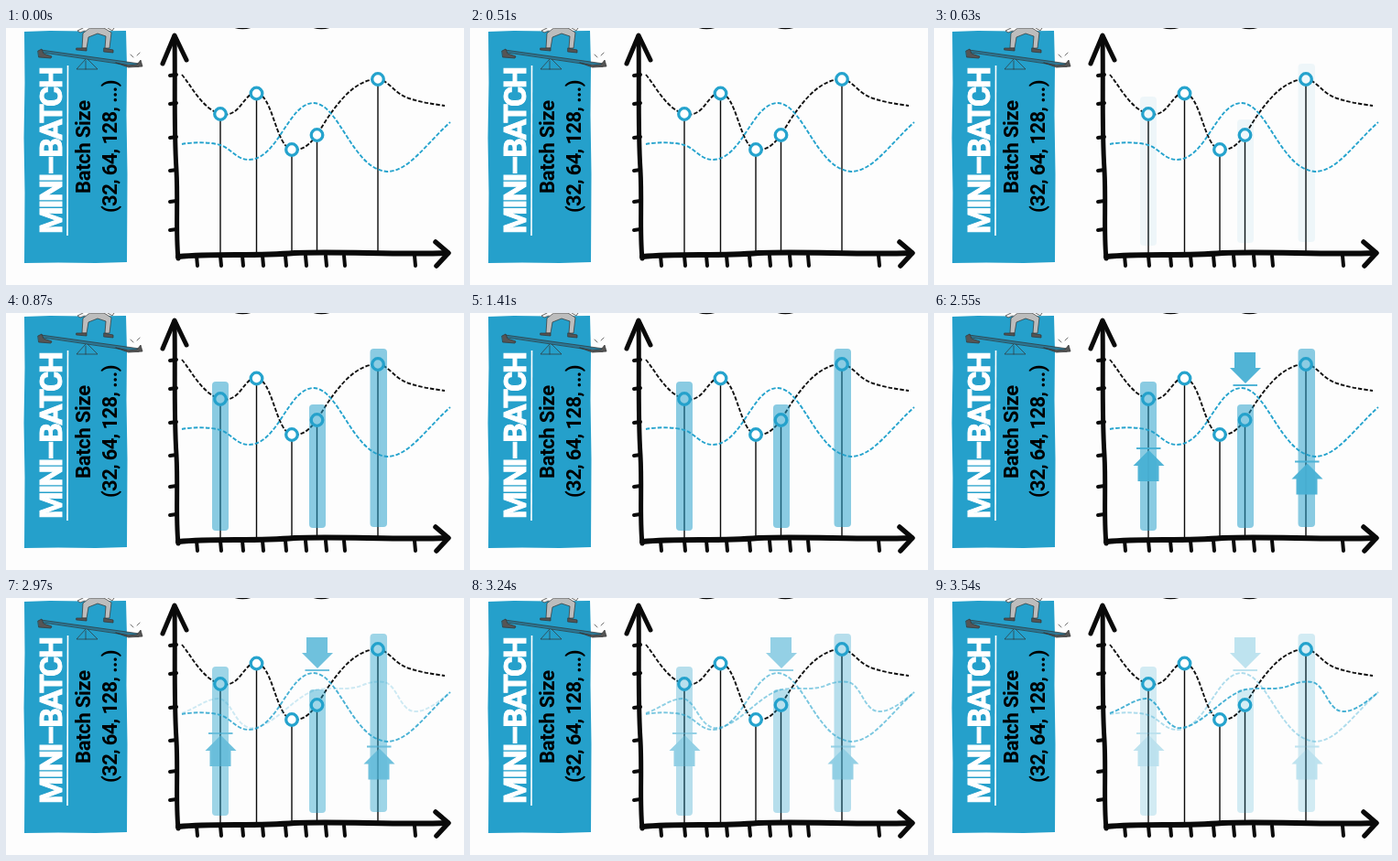
Recreate the animation shown at these times as an HTML page. Size 500 by 281 pixels, loop 3570 ms.

```html
<!DOCTYPE html>
<html lang="en">
<head>
<meta charset="utf-8">
<title>Mini-batch chart</title>
<style>
  html, body { margin: 0; width: 100%; height: 100%; overflow: hidden; background: #fdfdfd; }
  svg { display: block; width: 100vw; height: 100vh; }
  text { font-family: Roboto, sans-serif; font-weight: 700; }
  .ink { fill: none; stroke: #0a0a0a; stroke-linecap: round; stroke-linejoin: round; }
  .dash { fill: none; stroke-width: 1.9; stroke-dasharray: 4.5 2; }
  .blue { stroke: #25a3cd; }
</style>
</head>
<body>
<svg viewBox="0 0 500 281" preserveAspectRatio="none">
  <rect width="500" height="281" fill="#fdfdfd"/>

  <path fill="#25a0cb" d="M20 4L48 3L86 3.5L131 3L132 42L131.500 95L132.500 160L132 256L98 257L57 256.500L20 257L20.500 180L19.500 120L20.500 60Z"/>
  <g transform="rotate(-90)">
    <text x="-225" y="61" font-size="34" letter-spacing="-2.4" fill="#fff" stroke="#fff" stroke-width="1">MINI–BATCH</text>
    <text x="-181" y="91.500" font-size="22" letter-spacing="-.3">Batch Size</text>
    <text x="-202" y="121" font-size="22" letter-spacing="-.6">(32, 64, 128, ...)</text>
  </g>
  <path d="M67.500 41L67 227" stroke="#fff" stroke-width="1.600"/>

  <!-- figure on a seesaw -->
  <g stroke="#333" stroke-width=".7" stroke-linejoin="round" stroke-linecap="round">
    <path fill="none" d="M87 34L77 45H100L89 34M87 36V45M136 29L139 32M143 30L146 27"/>
    <path fill="#2b7795" d="M37 26L38 24L146 39L145 42Z"/>
    <path fill="#555" d="M35 25L39 23L41 28L50 31L49 33L36 32ZM120 38L133 41L143 40L147 35L149 42L134 43Z"/>
    <path fill="#bdbdbd" d="M92 0H107L115 5L113 22H108L109 9L100 6L90 10L88 22H83L84 6Z"/>
    <path fill="#eee" d="M84 0L78 3L81 5L86 3M111 0L116 3L118 0"/>
    <path fill="#555" d="M77 22H88V25L77 24ZM107 22L117 24V27L107 26Z"/>
  </g>

  <g class="ink">
    <path stroke-width="2.500" d="M249 -1.500Q258 1.500 268 -1.500M335 -1.500Q344 1.500 354 -1.500"/>
    <path stroke-width="5" d="M184 9C185 60 183 108 186 155C188 190 185 222 188 252"/>
    <path stroke-width="5" d="M171 39L184 8L197 35"/>
    <path stroke-width="6" d="M188 250C230 246 270 250 315 246C365 244 425 248 482 246"/>
    <path stroke-width="5.500" d="M469 234L483 246L470 260"/>
    <path id="ticks" stroke-width="4"/>
    <path id="stems" stroke-width="1.400" stroke-linecap="butt"/>
  </g>

  <path class="dash" stroke="#111" d="M192 51C203 64 214 88 234 94C256 99 258 72 273 71C291 72 294 127 311 133C331 136 340 115 352 97C366 77 383 56 406 56C418 57 424 72 440 77C452 81 465 83 479 85"/>
  <path id="before" class="dash blue" d="M192 127C202 125 220 124 234 128C246 132 252 144 265 144C297 144 308 82 336 82C364 83 378 154 416 157C440 157 460 125 485 103"/>
  <path id="after" class="dash blue" d="M192 126C205 122 217 111 231 110C246 110 249 138 266 142C290 144 315 106 340 100C358 97 375 102 390 95C400 91 408 91 413 92C427 95 430 122 445 124C459 125 473 113 485 103"/>
  <g id="dots" class="blue" fill="#fff" stroke-width="3.300"></g>

  <g id="overlay">
    <g id="bars" fill="#25a0cb">
      <rect x="225" y="75" width="18" height="163" rx="4"/>
      <rect x="331" y="100" width="18" height="135" rx="4"/>
      <rect x="397.500" y="39" width="18.500" height="195" rx="4"/>
    </g>
    <g id="arrows" fill="#48b0d4"></g>
  </g>
</svg>
<script>
  const LOOP = 3570;
  const $ = id => document.getElementById(id);

  const points = [[234, 94], [273.5, 71.5], [312, 133], [339.5, 117], [406, 56]];
  $('dots').innerHTML = points.map(([x, y]) => `<circle cx="${x}" cy="${y}" r="6.3"/>`).join('');
  $('stems').setAttribute('d', points.map(([x, y]) => `M${x} ${y}V246`).join(''));

  const leftTicks = [51, 82, 119, 155, 189, 220].map(y => `M179 ${y + 1}L186 ${y}`);
  const bottomTicks = [208, 234, 258, 280, 305, 327, 349, 369, 446].map(x => `M${x} 249L${x + 1} 260`);
  $('ticks').setAttribute('d', leftTicks.concat(bottomTicks).join(''));

  // Each arrow points at its short bar; the third value flips it.
  const arrows = [[234.5, 148, 1], [340, 79, -1], [407.5, 162.5, 1]];
  $('arrows').innerHTML = arrows.map(([x, y, flip]) =>
    `<path transform="translate(${x} ${y}) scale(1 ${flip})"
      d="M-13.5 -1H13V1H-13.5ZM0 2L17 19H11V36H-12V19H-17Z"/>`).join('');

  const ramp = (t, start, end) => Math.min(1, Math.max(0, (t - start) / (end - start)));
  const setOpacity = (id, value) => $(id).setAttribute('opacity', value);

  function draw(now) {
    const t = now % LOOP;
    const swap = ramp(t, 2760, 3560);
    const fade = 1 - 0.65 * swap;
    setOpacity('bars', 0.53 * ramp(t, 600, 870));
    setOpacity('arrows', 0.95 * ramp(t, 1800, 2100));
    setOpacity('overlay', fade);
    setOpacity('before', fade);
    setOpacity('after', 0.85 * swap);
    requestAnimationFrame(draw);
  }
  draw(0);
</script>
</body>
</html>
```
